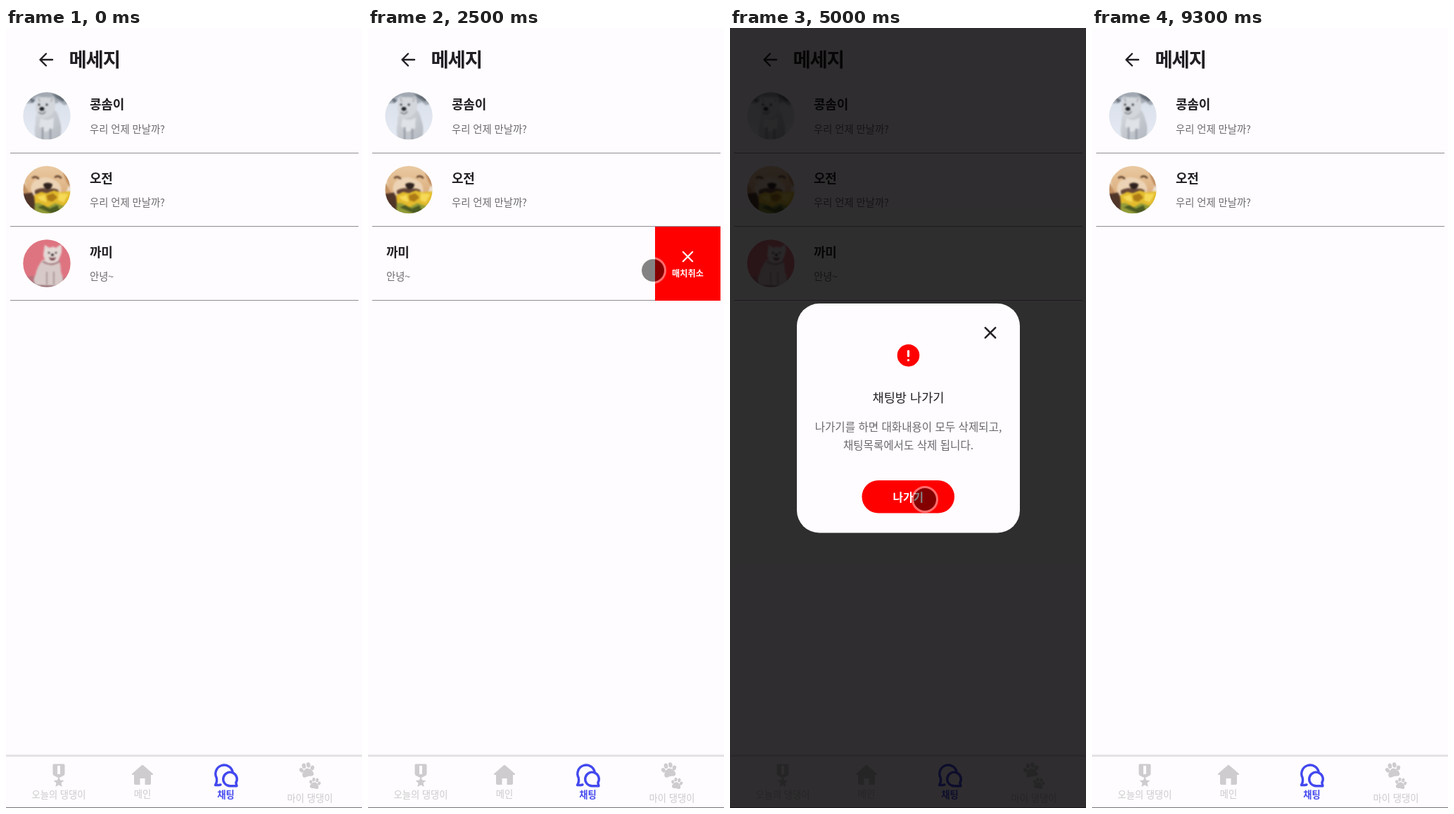
An HTML page that plays this animation: 506 px wide and 1107 px high, repeating every 9400 ms.

```html
<!DOCTYPE html>
<html lang="ko">
<head>
<meta charset="utf-8">
<title>메세지</title>
<style>
  html, body { margin: 0; width: 100%; height: 100%; overflow: hidden; background: #fefcfe; }
  svg { display: block; width: 100%; height: 100%; }
  text { font-family: "Noto Sans CJK KR", "Noto Sans CJK", "Noto Sans", sans-serif; }
  .title { font-size: 27.5px; font-weight: 700; letter-spacing: -1.2px; fill: #211f23; }
  .name { font-size: 18px; font-weight: 700; letter-spacing: -.2px; fill: #211f23; }
  .last { font-size: 14.3px; font-weight: 500; fill: #6a686c; }
  .rule { stroke: #928c97; stroke-width: 1; }
  .mid { text-anchor: middle; }
  .tab { font-size: 13.3px; font-weight: 500; fill: #cbc9cb; text-anchor: middle; }
  .tab.on { font-weight: 700; fill: #4348ee; }
  .grey { fill: #cecccf; }
  .line { fill: none; stroke-linecap: round; stroke-linejoin: round; }
  .body { font-size: 15.6px; font-weight: 500; fill: #6a686c; text-anchor: middle; }
  .photo { filter: blur(.9px); }

  #item, #slide, #dialog, #touch { animation: 9.4s linear infinite; }
  #item { animation-name: remove; }
  #slide { animation-name: swipe; }
  #dialog { animation-name: dialog; opacity: 0; }
  #touch { animation-name: touch; opacity: 0; }

  @keyframes remove {
    0%, 68.08% { visibility: visible; }
    68.09%, 100% { visibility: hidden; }
  }
  @keyframes swipe {
    0%, 15.96% { transform: translateX(0); animation-timing-function: ease-in-out; }
    22.87% { transform: translateX(-93px); }
    40.43% { transform: translateX(-93px); animation-timing-function: ease-out; }
    42.34%, 100% { transform: translateX(0); }
  }
  @keyframes dialog {
    0%, 40.64% { opacity: 0; }
    42.34%, 55.85% { opacity: 1; }
    57.98%, 100% { opacity: 0; }
  }
  @keyframes touch {
    0%, 4.26% { transform: translate(462px, 345px); opacity: 0; }
    5.32% { transform: translate(462px, 345px); opacity: 1; animation-timing-function: ease-in-out; }
    11.1% { transform: translate(347.7px, 339px); }
    15.96% { transform: translate(347.7px, 339px); animation-timing-function: ease-in-out; }
    22.87% { transform: translate(255px, 342px); animation-timing-function: ease-in-out; }
    26.5% { transform: translate(405px, 344px); }
    28.72% { transform: translate(405px, 344px); animation-timing-function: ease-in-out; }
    34.04% { transform: translate(441.5px, 344px); }
    44.15% { transform: translate(441.5px, 344px); animation-timing-function: ease-in-out; }
    51.06% { transform: translate(277px, 669px); }
    57.45% { transform: translate(277px, 669px); animation-timing-function: ease-in-out; }
    63.83% { transform: translate(260.5px, 670.5px); }
    77.13% { transform: translate(260.5px, 670.5px); opacity: 1; animation-timing-function: ease-in; }
    82.98% { transform: translate(535px, 640px); opacity: 1; }
    83%, 100% { transform: translate(535px, 640px); opacity: 0; }
  }
</style>
</head>
<body>
<svg viewBox="0 0 506 1107" preserveAspectRatio="none">
  <defs>
    <clipPath id="round"><circle r="33.7"/></clipPath>
    <clipPath id="rowBox"><rect x="6" y="282" width="495" height="105"/></clipPath>
    <linearGradient id="snow" x2="0" y2="1">
      <stop offset="0" stop-color="#c3cad5"/><stop offset=".3" stop-color="#dce2ec"/><stop offset="1" stop-color="#e6ebf4"/>
    </linearGradient>
    <linearGradient id="fur" x2="1" y2="1">
      <stop offset="0" stop-color="#d6d9de"/><stop offset="1" stop-color="#b3b8c0"/>
    </linearGradient>
    <linearGradient id="cream" x2="0" y2="1">
      <stop offset="0" stop-color="#ebcba4"/><stop offset="1" stop-color="#d9aa78"/>
    </linearGradient>
    <linearGradient id="shade" x2="0" y2="1">
      <stop offset="0" stop-color="#000" stop-opacity="0"/><stop offset="1" stop-color="#000" stop-opacity=".16"/>
    </linearGradient>
    <path id="cross" class="line" d="M-1-1 1 1M1-1-1 1" vector-effect="non-scaling-stroke"/>
    <g id="paw">
      <path d="M0-2.500C4-2.500 10 4 8.500 8.500 7 12 4 10 0 10S-7 12-8.500 8.500C-10 4-4-2.500 0-2.500z"/>
      <ellipse cx="-8.500" cy="-1.500" rx="2.900" ry="3.700" transform="rotate(-25 -8.500 -1.500)"/>
      <ellipse cx="-3.500" cy="-7" rx="3" ry="4"/>
      <ellipse cx="3.500" cy="-7" rx="3" ry="4"/>
      <ellipse cx="8.500" cy="-1.500" rx="2.900" ry="3.700" transform="rotate(25 8.500 -1.500)"/>
    </g>
  </defs>

  <rect width="506" height="1107" fill="#fefcfe"/>
  <path class="line" d="M66 45H49M57 36.5 48.5 45 57 53.5" stroke="#211f23" stroke-width="2.4"/>
  <text class="title" x="89.5" y="54.5">메세지</text>

  <g transform="translate(58 124.8)" clip-path="url(#round)">
    <g class="photo">
      <rect x="-36" y="-36" width="72" height="72" fill="url(#snow)"/>
      <path d="M-34-34H34V-19L25-15 18-20 11-17 8-26-14-27-22-18-34-18z" fill="#a2a9b2"/>
      <path d="M7-32 28-26 23-20 14-25zM-25-26-16-22-21-18z" fill="#656d76"/>
      <path d="M-12-8Q-17 1-16 10-19 22-15 34H18Q23 19 18 6 16-4 11-9z" fill="url(#fur)"/>
      <path d="M-16-13-13-28-6-25Q0-28 4-25L9-28Q14-18 11-9 8 2-4 3-16 2-16-13z" fill="#d3d6da"/>
      <path d="M-9 3Q0 9 10 2L9 18-2 23-11 15z" fill="#dfe2e6"/>
      <path d="M-6 16V34M5 18V34" stroke="#979da6" stroke-width="2.5"/>
      <path d="M-12-26-10-20M8-26 6-20" stroke="#adb0b5" stroke-width="2"/>
      <path d="M-11-5Q-6-1-2-6" class="line" stroke="#777a80" stroke-width="1.6"/>
      <ellipse cx="-7" cy="-10" rx="3.4" ry="2.8" fill="#1f2125"/>
      <circle cx="-11" cy="-16" r="1.5" fill="#303236"/><circle cx="0" cy="-16" r="1.6" fill="#303236"/>
    </g>
  </g>
  <text class="name" x="119" y="115.3">콩솜이</text>
  <text class="last" x="119" y="148.7">우리 언제 만날까?</text>
  <path class="rule" d="M6 177.5H501"/>

  <g transform="translate(58 229.5)" clip-path="url(#round)">
    <g class="photo">
      <rect x="-36" y="-36" width="72" height="72" fill="#ede2d4"/>
      <path d="M-30-36H23Q33-23 31-8 28 10 16 13L-25 9Q-34-6-30-36z" fill="url(#cream)"/>
      <path d="M-34-12Q-29-1-23 8L-34 9zM22-30Q25-14 33-3V-24z" fill="#c18f61"/>
      <path d="M-18-12Q-4-23 14-12 24-4 18 8H-20Q-26-4-18-12z" fill="#ecd3b5"/>
      <path d="M-17 1Q-5-5 2 0 10-4 17 1L15 6H-17z" fill="#644536"/>
      <path d="M-5-8Q1-12 8-8 8-2 2 0-5-2-5-8z" fill="#30231f"/>
      <path d="M-20-17Q-16-20-12-16M12-18Q16-21 20-17" class="line" stroke="#5a3b28" stroke-width="2.5"/>
      <path d="M-34 6-21 4-14 18-9 34H-34z" fill="#503529"/>
      <path d="M-17 15 34 10V36H-18z" fill="#929c39"/>
      <path d="M-13 25-3 21 4 27 15 22 19 30 8 34z" fill="#4b5b22"/>
      <path d="M-18 8-8 3 0 5 10 1 20 4 34 2V15L24 23 12 19 1 25-10 19-17 19z" fill="#e3bb2c"/>
      <path d="M-14 10-3 7 0 18-9 15zM17 5 31 6 24 18 16 15z" fill="#f5d957"/>
      <path d="M0 8 9 5 15 11 8 17 1 15z" fill="#ad7b16"/>
    </g>
  </g>
  <text class="name" x="119" y="219.8">오전</text>
  <text class="last" x="119" y="253.3">우리 언제 만날까?</text>
  <path class="rule" d="M6 281.5H501"/>

  <g id="item">
    <g clip-path="url(#rowBox)">
      <g id="slide">
        <g transform="translate(58 334)">
          <g clip-path="url(#round)">
            <g class="photo">
              <rect x="-36" y="-36" width="72" height="72" fill="#df7481"/>
              <path d="M-36 20Q-12 14 36 22V36H-36z" fill="#b8727b"/>
              <path d="M-36 28Q-12 23 36 28V36H-36z" fill="#8f646b"/>
              <path d="M-6-5Q-14 5-16 16-22 27-14 31L20 32Q26 25 20 12 20 1 17-5z" fill="#d7c9c7"/>
              <path d="M-5-12-3-26 4-22Q9-25 13-22L20-27Q23-18 19-10 16 0 8 0-3 0-5-12z" fill="#e4d8d5"/>
              <path d="M-5-2Q7 5 18-3" class="line" stroke="#9b6f75" stroke-width="2"/>
              <path d="M0 12V30M10 12V30" stroke="#ab9a9b" stroke-width="2"/>
              <circle cx="3" cy="-15" r="1.3" fill="#34292b"/><circle cx="13" cy="-15" r="1.3" fill="#34292b"/>
              <ellipse cx="8" cy="-12" rx="2.2" ry="1.7" fill="#2c2427"/>
              <path d="M3-9Q8-6 13-9 12-4 8-4 4-4 3-9z" fill="#74434a"/>
            </g>
          </g>
        </g>
        <text class="name" x="119" y="324.5">까미</text>
        <text class="last" x="119" y="357.8">안녕~</text>
        <path class="rule" d="M6 386.5H501"/>
        <rect x="501" y="282" width="93" height="105" fill="#fe0000"/>
        <use href="#cross" transform="translate(547.5 324.5) scale(6.7)" stroke="#fff" stroke-width="2.2"/>
        <text class="mid" x="547.5" y="353" font-size="12.2" font-weight="700" fill="#fff">매치취소</text>
      </g>
    </g>
  </g>

  <rect y="1030" width="506" height="4" fill="url(#shade)"/>
  <rect y="1034" width="506" height="73" fill="#fefcfe"/>
  <path d="M0 1106.5H506" stroke="#77757a"/>

  <g class="grey">
    <path d="M68 1044.5H82Q83.5 1044.5 83.5 1046V1058Q83.5 1060 82 1061L75 1064.5 68 1061Q66.5 1060 66.5 1058V1046Q66.5 1044.5 68 1044.5z"/>
    <path d="M73 1047H77V1059H73z" fill="#fefcfe"/>
    <path d="M75 1062.5 77.2 1067.5 82.5 1068 78.5 1071.6 79.7 1077 75 1074.2 70.3 1077 71.5 1071.6 67.5 1068 72.8 1067.5z"/>
    <path d="M193 1046.3Q194 1045.5 195 1046.3L209 1058.5Q209.5 1060 208 1060H206V1072Q206 1074 204 1074H197.5V1065H190.5V1074H184Q182 1074 182 1072V1060H180Q178.5 1060 179 1058.5z"/>
    <use href="#paw" transform="translate(428 1053) rotate(-12) scale(.93)"/>
    <use href="#paw" transform="translate(439 1072) rotate(10) scale(.71)"/>
  </g>
  <g class="line" stroke="#4348ee" stroke-width="3.4">
    <path d="M305 1074Q301 1075 297.5 1074.5 300.5 1070 299.2 1064A12.3 12.3 0 1 1 322.2 1056"/>
    <path d="M328 1075.8H318.5A9.8 9.8 0 1 1 326.8 1071.2z"/>
  </g>
  <text class="tab" x="75" y="1093.3">오늘의 댕댕이</text>
  <text class="tab" x="194" y="1092">메인</text>
  <text class="tab on" x="312.5" y="1093.3">채팅</text>
  <text class="tab" x="432" y="1098.3">마이 댕댕이</text>

  <g id="dialog">
    <rect width="506" height="1107" fill="#020002" fill-opacity=".82"/>
    <rect x="95" y="391" width="317" height="325.5" rx="32" fill="#fefcfe"/>
    <use href="#cross" transform="translate(370 432.5) scale(7.2)" stroke="#211f23" stroke-width="2.5"/>
    <circle cx="253.5" cy="464.7" r="15.8" fill="#fe0000"/>
    <path class="line" d="M253.5 458.5V465.5M253.5 471.3V471.4" stroke="#fff" stroke-width="3.2"/>
    <text class="mid" x="253.5" y="530.5" font-size="17.6" font-weight="500" fill="#211f23">채팅방 나가기</text>
    <text class="body" x="253.5" y="571.5">나가기를 하면 대화내용이 모두 삭제되고,</text>
    <text class="body" x="253.5" y="597.5">채팅목록에서도 삭제 됩니다.</text>
    <rect x="187.5" y="642" width="131.5" height="46.5" rx="23.25" fill="#fe0000"/>
    <text class="mid" x="253.3" y="671.5" font-size="15.8" font-weight="700" fill="#fff">나가기</text>
  </g>

  <g id="touch">
    <circle r="16" fill="#000" fill-opacity=".48"/>
    <circle r="17.5" fill="none" stroke="#fff" stroke-opacity=".42" stroke-width="3"/>
  </g>
</svg>
</body>
</html>
```
